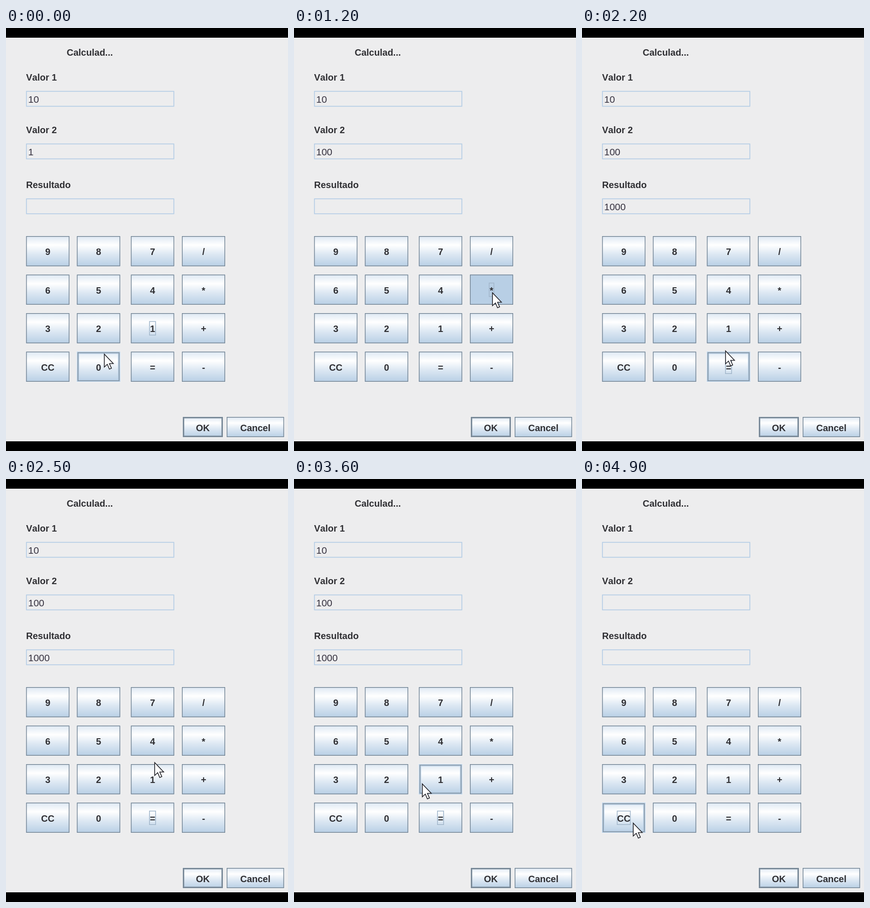
Write an HTML page that moves like this. It is 611x917 px and loops after 5 s.

```html
<!DOCTYPE html>
<html lang="es">
<head>
<meta charset="utf-8">
<title>Calculadora</title>
<style>
  html, body { margin: 0; width: 100%; height: 100%; overflow: hidden; background: #000; }
  svg { display: block; width: 611px; height: 917px; }
  text { font: bold 20px "Liberation Sans", Arial, sans-serif; font-kerning: none; fill: #2f2f33; }
  .value { font-weight: normal; font-size: 21px; fill: #35313f; }
  .mid { text-anchor: middle; }
</style>
</head>
<body>
<svg id="stage" viewBox="0 0 611 917">
  <defs>
    <linearGradient id="steel" x1="0" y1="0" x2="0" y2="1">
      <stop offset="0" stop-color="#dde8f3"/>
      <stop offset=".3" stop-color="#fff"/>
      <stop offset=".6" stop-color="#dde8f3"/>
      <stop offset="1" stop-color="#b8cfe5"/>
    </linearGradient>
  </defs>
  <rect width="611" height="917"/>
  <rect y="21" width="611" height="875" fill="#ededee"/>
</svg>
<script>
const LOOP = 5000, STEP = 100, PX = 1.67;
const DARK = '#7a8a99', LIGHT = '#b8cfe5';
const stage = document.getElementById('stage');

function add(tag, attrs, parent = stage) {
  const el = document.createElementNS('http://www.w3.org/2000/svg', tag);
  for (const k in attrs) el.setAttribute(k, attrs[k]);
  return parent.appendChild(el);
}

function label(str, x, y, cls = '') {
  const el = add('text', { x, y, class: cls });
  el.textContent = str;
  return el;
}

// Outline drawn inside the given box
function frame(x, y, w, h, stroke, line = PX, parent = stage) {
  return add('rect', {
    x: x + line / 2, y: y + line / 2, width: w - line, height: h - line,
    fill: 'none', stroke, 'stroke-width': line
  }, parent);
}

function field(name, y, top) {
  label(name, 43.5, y);
  frame(43.5, top, 321, 34, '#b1cbe5');
  return label('', 48, top + 25, 'value');
}

function face(x, y, w, h) {
  frame(x - 1, y - 1, w + 2, h + 2, '#f5f6f7', 1);
  return add('rect', { x, y, width: w, height: h, fill: 'url(#steel)' });
}

function key(name, x, y) {
  const w = 94, h = 65.5, cx = x + w / 2;
  const body = face(x, y, w, h);
  const edge = frame(x, y, w, h, DARK);
  const hover = add('g', {});
  [LIGHT, DARK, LIGHT].forEach((c, i) =>
    frame(x + i * PX, y + i * PX, w - 2 * i * PX, h - 2 * i * PX, c, PX, hover));
  const fw = name === 'CC' ? 30 : name === '*' ? 12 : 15;
  const focus = frame(cx - fw / 2, y + 17.5, fw, 31, '#a3b8cc');
  label(name, cx, y + 41, 'mid');
  return { name, x, y, w, h, body, edge, hover, focus };
}

function dialogButton(name, x, w, line) {
  face(x, 843, w, 44);
  frame(x, 843, w, 44, DARK, line);
  label(name, x + w / 2, 873.5, 'mid');
}

label('Calculad...', 131.5, 60);
const fields = [
  field('Valor 1', 114, 136.5),
  field('Valor 2', 228, 250.5),
  field('Resultado', 347, 369.5)
];

const cols = [43.5, 153.5, 270.5, 381], rows = [451, 534.5, 618, 701.5];
const keys = ['9 8 7 /', '6 5 4 *', '3 2 1 +', 'CC 0 = -'].flatMap((row, r) =>
  row.split(' ').map((name, c) => key(name, cols[c], rows[r])));
dialogButton('OK', 383, 87, 3.2);
dialogButton('Cancel', 478, 124.5, PX);

const arrow = add('path', {
  d: 'M0 0V28L6.5 22L11 32.5L15.5 30.5L11 20.5H19.5Z',
  fill: '#fff', stroke: '#1c1c22', 'stroke-width': 1.6
});

// time, x, y of the pointer tip
const path = [
  [0, 213, 707], [400, 213, 707], [700, 315, 659], [1100, 430, 574],
  [1300, 430, 574], [1600, 374, 675], [1900, 312, 702], [2200, 311, 700],
  [2900, 337, 501], [4300, 219, 821], [4600, 112, 747], [4900, 111, 746]
];
const presses = [[100, '0'], [300, '0'], [1200, '*'], [2000, '='], [4700, 'CC']];
const values = [
  [0, '10', '1', ''], [200, '10', '10', ''], [400, '10', '100', ''],
  [2100, '10', '100', '1000'], [4800, '', '', '']
];

const latest = (list, t) => list.filter(e => e[0] <= t).pop();

function pointer(t) {
  const a = latest(path, t), b = path[path.indexOf(a) + 1] || a;
  const k = b === a ? 0 : (t - a[0]) / (b[0] - a[0]);
  return [a[1] + (b[1] - a[1]) * k, a[2] + (b[2] - a[2]) * k];
}

const show = (el, on) => el.setAttribute('visibility', on ? 'visible' : 'hidden');

function draw(t) {
  const [px, py] = pointer(t);
  arrow.setAttribute('transform', `translate(${px} ${py})`);
  const press = latest(presses, t);
  const focused = press ? press[1] : '1';
  const down = press && t - press[0] < STEP;
  for (const k of keys) {
    const over = px >= k.x && px <= k.x + k.w && py >= k.y - 2 && py <= k.y + k.h;
    const held = down && k.name === focused;
    k.body.setAttribute('fill', held ? LIGHT : 'url(#steel)');
    show(k.hover, over && !held);
    show(k.edge, !over || held);
    show(k.focus, k.name === focused);
  }
  const now = latest(values, t);
  fields.forEach((f, i) => { f.textContent = now[i + 1]; });
}

const start = performance.now();
function tick() {
  const t = (performance.now() - start) % LOOP;
  draw(Math.floor(t / STEP) * STEP);
  requestAnimationFrame(tick);
}
tick();
</script>
</body>
</html>
```
